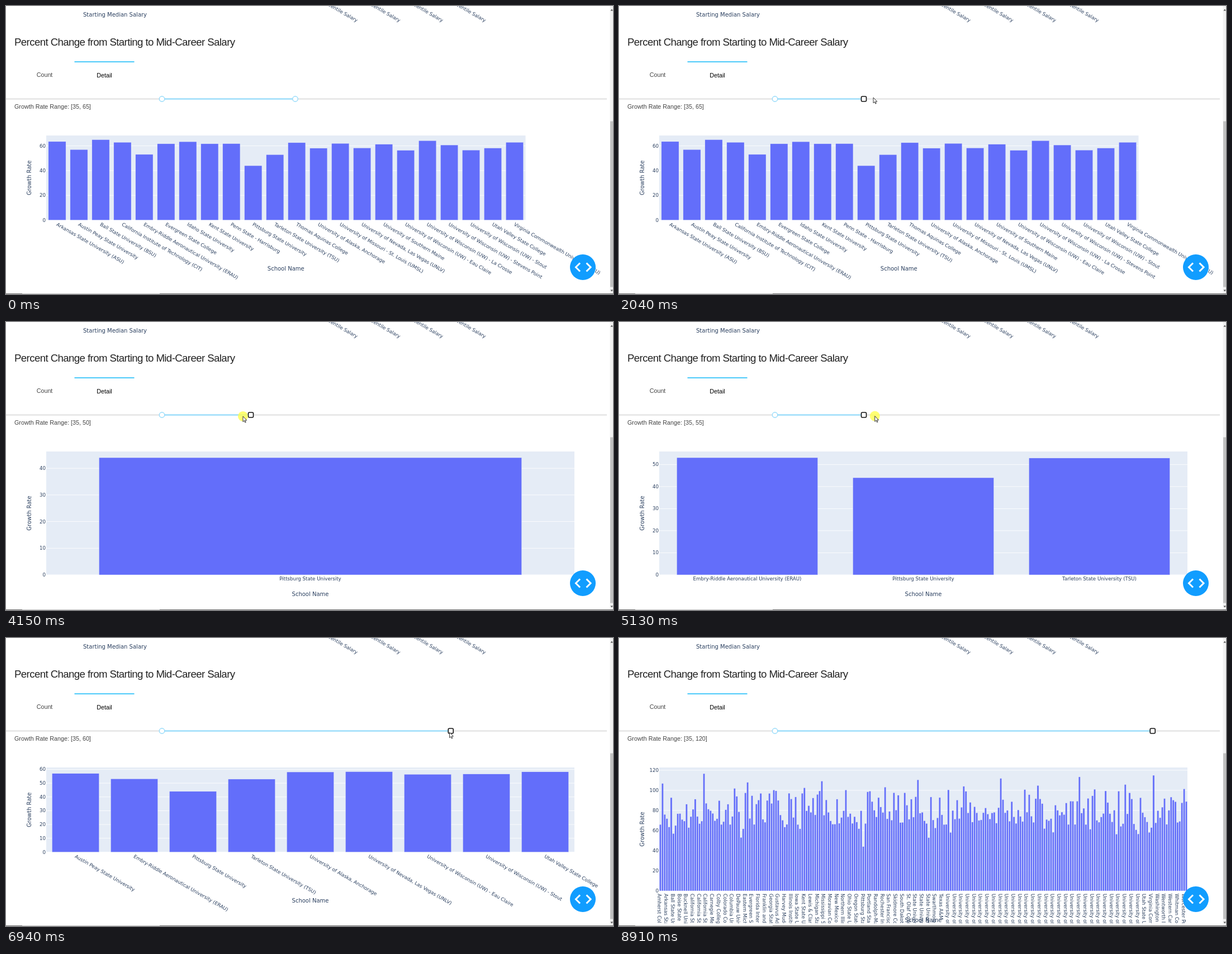
Write an HTML page that moves like this. It is 1086 px wide and 516 px high and loops after 9.28 s.

```html
<!DOCTYPE html>
<html lang="en">
<head>
<meta charset="utf-8">
<title>Growth rate slider</title>
<style>
  html, body { margin: 0; width: 1086px; height: 516px; overflow: hidden; background: #fff; }
  svg { display: block; }
  text { font: 8.65px "DejaVu Sans", Verdana, sans-serif; fill: #2a3f5f; }
  .axis { font-size: 10px; text-anchor: middle; }
  .page { font: 10.75px "Liberation Sans", Arial, sans-serif; fill: #444; }
  .head { font-size: 18.64px; letter-spacing: -.59px; fill: #222; }
  .mid { text-anchor: middle; }
  .end { text-anchor: end; }
</style>
</head>
<body>
<svg width="1086" height="516" viewBox="0 0 1086 516">
  <clipPath id="area"><rect width="1080" height="511"/></clipPath>
  <text x="138" y="18.5" style="font-size:10px">Starting Median Salary</text>
  <g id="topLabels"></g>
  <text class="page head" x="15" y="70.5">Percent Change from Starting to Mid-Career Salary</text>
  <text class="page mid" x="69" y="127">Count</text>
  <text class="page mid" x="176" y="127.5" style="fill:#000">Detail</text>
  <path d="M122.5 100H229.5" stroke="#10b9f8" stroke-width="1.6"/>
  <path d="M0 166.5H1075" stroke="#e9e9e9" stroke-width="3"/>
  <path id="track" stroke="#abe2fb" stroke-width="3"/>
  <circle cx="279" cy="166.5" r="4.7" fill="#fff" stroke="#96dbfa" stroke-width="1.4"/>
  <circle id="knob" cx="517.5" cy="166.5" r="4.7" fill="#fff" stroke="#96dbfa" stroke-width="1.4"/>
  <rect id="focusKnob" y="162" width="9" height="9" rx="2" fill="#fff" stroke="#101010" stroke-width="1.6"/>
  <text id="range" class="page" x="15" y="184"></text>
  <g id="charts" clip-path="url(#area)"></g>
  <circle cx="1032" cy="468" r="23" fill="#119dff"/>
  <path d="M1027 460.5L1019.5 468L1027 475.5M1038.5 460.5L1046 468L1038.5 475.5" fill="none" stroke="#fff" stroke-width="3"/>
  <rect x="1080.5" width="5.5" height="516" fill="#f1f1f1"/>
  <rect x="1081" y="206.5" width="5" height="297" fill="#c1c1c1"/>
  <path d="M1081.5 8.5L1083.7 5.5L1086 8.5ZM1081.5 508.5L1083.7 511.5L1086 508.5Z" fill="#555"/>
  <path d="M0 515.5H1086" stroke="#6a6a6a"/>
  <path d="M29 515.5H275" stroke="#c4c4c4"/>
  <g id="cursor">
    <circle id="press" r="9" fill="#ffff50" fill-opacity=".8"/>
    <path d="M0 0V9.8L2.3 7.7L3.8 11.2L5.3 10.5L3.8 7.2H6.8Z" fill="#fff" stroke="#222" stroke-width=".9"/>
  </g>
</svg>
<script>
const LOOP = 9280;
const $ = id => document.getElementById(id);

let seed = 11;
const random = () => (seed = seed * 16807 % 2147483647) / 2147483647;

// Most schools grow by 66 to 100 %; the named ones by 65 % or less
const schools = Array.from({ length: 222 }, () => ({ v: 66 + 33.5 * random() ** 1.5 }));
[
  [3, 63.5, 'Arkansas State University (ASU)'], [5, 57, 'Austin Peay State University'],
  [6, 65, 'Ball State University (BSU)'], [12, 62.9, 'California Institute of Technology (CIT)'],
  [34, 53.1, 'Embry-Riddle Aeronautical University (ERAU)'], [35, 61.7, 'Evergreen State College'],
  [52, 63.4, 'Idaho State University'], [59, 61.7, 'Kent State University'],
  [83, 61.8, 'Penn State - Harrisburg'], [85, 44, 'Pittsburg State University'],
  [113, 52.9, 'Tarleton State University (TSU)'], [116, 62.6, 'Thomas Aquinas College'],
  [122, 58.1, 'University of Alaska, Anchorage'], [161, 62, 'University of Missouri - St. Louis (UMSL)'],
  [165, 58.3, 'University of Nevada, Las Vegas (UNLV)'], [181, 61.3, 'University of Southern Maine'],
  [192, 56.4, 'University of Wisconsin (UW) - Eau Claire'], [194, 64.2, 'University of Wisconsin (UW) - La Crosse'],
  [200, 60.7, 'University of Wisconsin (UW) - Stevens Point'], [201, 56.6, 'University of Wisconsin (UW) - Stout'],
  [206, 58.2, 'Utah Valley State College'], [207, 62.9, 'Virginia Commonwealth University (VCU)']
].forEach(([i, v, name]) => schools[i] = { v, name });

// Twenty peaks above 100 %, spread over the whole list
for (let k = 0; k < 20; k++) {
  const u = (k * 7 + 12) % 20 / 19;
  schools.splice(Math.floor((k + random()) * 12.1), 0, { v: 100.3 + 16.3 * u * u });
}

// Every third school is labelled in the crowded charts
const labels = (before, count, after) =>
  [...before.split(','), ...Array(count).fill('University of'), ...after.split(',')];
const crowded = {
  100: labels('Amherst College,Arkansas State,Ball State University,Bowling Green,California Institute,California State,California State,Carnegie Mellon,Colby College,Columbia University,Denison University,Eastern Washington,Fitchburg State,Florida State,George Mason,Gettysburg College,Hamilton College,Humboldt State,Illinois State,Juniata College,Lafayette College,Louisiana State,Middlebury College,Missouri State,Morehead State,North Carolina,Oberlin College,Oklahoma State,Pennsylvania State,Portland State,Randolph-Macon,Rutgers University,San Jose State,Smith College,Southern Illinois,State University,State University,Stevens Institute,Tennessee',
    29, 'Ursinus College,Virginia Commonwealth,Washington,Wentworth Institute,Western Michigan,Williams College'),
  120: labels('Amherst College,Arkansas State,Ball State University,Boise State,Bucknell University,California State,California State,California State,Carnegie Mellon,Colby College,Colorado College,Columbia University,DePauw University,Eastern Michigan,Evergreen State,Florida International,Franklin and Marshall,Georgia State,Gustavus Adolphus,Harvey Mudd,Illinois Institute,Iowa State University,Kent State University,Lewis & Clark,Michigan State,Mississippi State,Moravian College,New Mexico State,Northern Illinois,Ohio State University,Oregon State,Pittsburg State,Portland State,Randolph-Macon,Rochester Institute,San Francisco,Skidmore College,South Dakota,St. Olaf College,State University,State University,State University,Swarthmore,Texas A&M',
    30, 'Utah State University,Virginia Commonwealth,Washington,Wentworth Institute,Western Carolina,Whitman College,Worcester Polytechnic')
};

const text = (s, x, y, cls = '', turn = 0) =>
  `<text class="${cls}" transform="translate(${x} ${y}) rotate(${turn})">${s.replace('&', '&amp;')}</text>`;
const rect = (x, y, w, h, fill, more = '') =>
  `<rect x="${x}" y="${y}" width="${w}" height="${h}" fill="${fill}" ${more}/>`;

function chart(max) {
  const rows = schools.filter(s => s.v <= max), n = rows.length;
  const slanted = n > 3 && n < 50;
  const left = 72, top = 232, right = n === 22 ? 929.5 : 1017, bottom = slanted ? 383.5 : 453;
  const step = (right - left) / n;
  const scale = (bottom - top) * .95 / Math.max(...rows.map(s => s.v));
  const center = i => left + (i + .5) * step;
  let out = rect(left, top, right - left, bottom - top, '#e5ecf6');
  for (let v = 0, y = bottom; y > top; v += max > 60 ? 20 : 10, y = bottom - v * scale)
    out += rect(left, y - .4, right - left, .8, '#fff') + text(String(v), 71, y + 3, 'end');
  rows.forEach((s, i) => {
    out += rect(center(i) - step * .4, bottom - s.v * scale, step * .8, s.v * scale, '#636efa', 'stroke="#e5ecf6" stroke-width=".36"');
    if (slanted) out += text(s.name, center(i) - 2, 393, '', 30);
    else if (n < 4) out += text(s.name, center(i), 462.5, 'mid');
  });
  (crowded[max] || []).forEach((s, i) => out += text(s, center(i * 3) - 4.5, 458, '', 90));
  const titleY = slanted ? 473.5 : n < 4 ? 490.5 : 508.5;
  out += text('School Name', (left + right) / 2, titleY, 'axis');
  out += text('Growth Rate', 45, (top + bottom) / 2, 'axis', -90);
  return `<g id="chart${max}">${out}</g>`;
}
$('charts').innerHTML = [50, 55, 60, 65, 100, 120].map(chart).join('');
$('topLabels').innerHTML = [0, 1, 2, 3].map(i => text('Percentile Salary', 627 + i * 76.5, 29, 'end', 30)).join('');

// Pointer moves; those with a release are drags, which redraw the chart a little later
const start = { x: 1064, y: 490 };
const moves = [
  { from: 70, to: 950, x: 516, y: 166 },
  { from: 1260, to: 1860, x: 455, y: 164, release: 2040 },
  { from: 2500, to: 2740, x: 438, y: 163 },
  { from: 2910, to: 3180, x: 402, y: 165, ease: 2.5, release: 3330 },
  { from: 3720, to: 4270, x: 430, y: 170, release: 4500 },
  { from: 4500, to: 4790, x: 439, y: 168 },
  { from: 4970, to: 5190, x: 474, y: 169, ease: 2, release: 5340 },
  { from: 5830, to: 6690, x: 790, y: 176, ease: .9, release: 6770 },
  { from: 6770, to: 7060, x: 796, y: 164 },
  { from: 7250, to: 7710, x: 952, y: 167, ease: .5, release: 7850 },
  { from: 8320, to: 8910, x: 1088, y: 492 }
];
const drags = moves.filter(m => m.release);
const DELAY = 180;

function pointer(t) {
  let at = start;
  for (const m of moves) {
    if (t < m.from) break;
    const k = Math.min(1, (t - m.from) / (m.to - m.from)) ** (m.ease || 1);
    at = { x: at.x + (m.x - at.x) * k, y: at.y + (m.y - at.y) * k };
  }
  return at;
}

const knobX = v => 279 + (v - 35) * 7.95;
function snap(x) {
  const v = 35 + (x - 279) / 7.95, step = v < 70 ? 5 : 10;
  return Math.round(v / step) * step;
}
function slider(t) {
  const drag = drags.filter(d => d.from <= t).pop();
  return drag ? snap(pointer(Math.min(t, drag.to)).x) : 65;
}
function chartMax(t) {
  const drag = drags.filter(d => d.release + DELAY <= t).pop();
  return drag ? snap(drag.x) : 65;
}

const show = (el, on) => el.style.display = on ? '' : 'none';

function draw(now) {
  const t = now % LOOP, x = knobX(slider(t)), at = pointer(t), max = chartMax(t);
  for (const g of $('charts').children) show(g, g.id === 'chart' + max);
  $('range').textContent = `Growth Rate Range: [35, ${max}]`;
  $('track').setAttribute('d', `M279 166.5H${x}`);
  $('focusKnob').setAttribute('x', x - 4.5);
  show($('knob'), t < drags[0].from);
  show($('focusKnob'), t >= drags[0].from);
  $('cursor').setAttribute('transform', `translate(${at.x} ${at.y})`);
  show($('cursor'), t >= 70 && t < 8910);
  show($('press'), drags.some(d => t >= d.from && t < d.release));
  requestAnimationFrame(draw);
}
requestAnimationFrame(draw);
</script>
</body>
</html>
```
